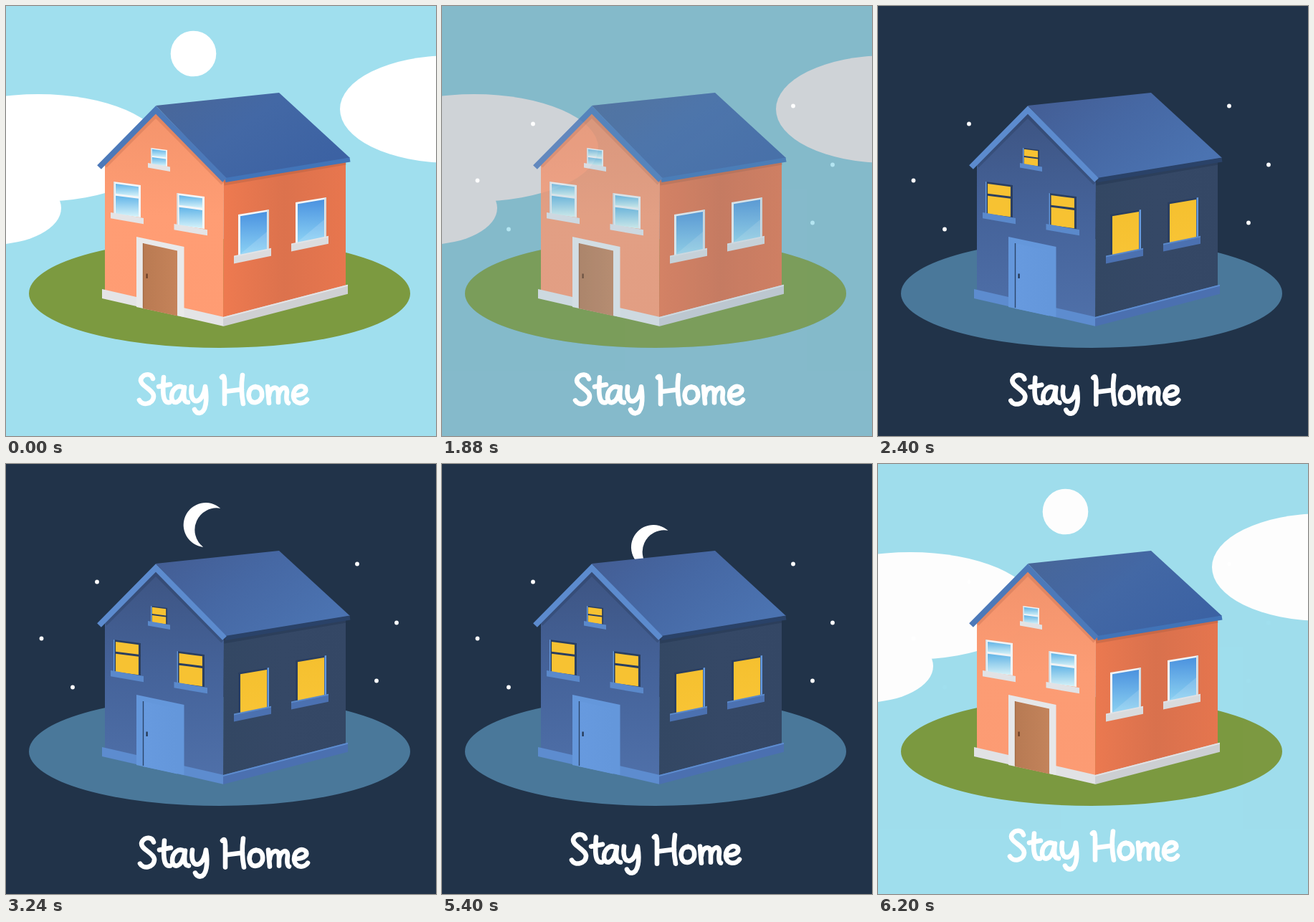
Recreate the animation shown at these times as an HTML page. Size 600x600 px, loop 6.24 s.

```html
<!DOCTYPE html>
<html lang="en">
<head>
<meta charset="utf-8">
<title>Stay Home</title>
<style>
  html, body { margin: 0; width: 100%; height: 100%; overflow: hidden; background: #a0dfee; }
  svg { display: block; width: 100vw; height: 100vh; }
</style>
</head>
<body>
<svg id="stage" viewBox="0 0 600 600"></svg>
<script>
const LOOP = 6240, STEP = 40;

const day = {
  id: 'day', sky: '#a0dfee', grass: '#7c9a40',
  front: ['#f4946c', '#ff9d74', '#ff9c73'], side: ['#ee7a50', '#dc724d', '#e8764e'],
  shade: '#b35f41', roof: ['#4a6798', '#4368a5', '#3c62a3'],
  fascia: '#4c79b9', eave: '#4274b8', baseFront: '#e4e4e6', baseSide: '#cfd0d3',
  door: ['#b97a52', '#c5835a'], doorFrame: '#e9e9ea', doorLine: '#a56a45', knob: '#6b3f27',
  frame: '#f3f6f8', edge: '#d3dade', sill: '#e4e4e6', sideSill: '#dcdcde',
  pane: ['#61b4e8', '#d6f3fa'], sidePane: ['#4a92e0', '#8dd3f5'], glint: .14
};
const night = {
  id: 'night', sky: '#213349', grass: '#4a789a',
  front: ['#3d5482', '#45639a', '#4f70a9'], side: ['#334763', '#354866', '#344765'],
  shade: '#22344f', roof: ['#435c92', '#4668a4', '#4b73b1'],
  fascia: '#5c8bce', eave: '#2a4268', baseFront: '#5d8ccf', baseSide: '#4b70b0',
  door: ['#679adf', '#6497db'], doorFrame: '#6497db', doorLine: '#2c4569', knob: '#21344f',
  frame: '#2a3e60', edge: '#659ae0', sill: '#5a89cb', sideSill: '#4b71b1',
  pane: ['#f7c232', '#f7c232'], sidePane: ['#f5c02f', '#f8c435'], glint: 0
};

const poly = (points, fill) => `<polygon points="${points}" fill="${fill}"/>`;
const line = (d, color, width, extra = '') =>
  `<path d="${d}" fill="none" stroke="${color}" stroke-width="${width}" ${extra}/>`;
const ellipse = (cx, cy, rx, ry, fill = '#fff') =>
  `<ellipse cx="${cx}" cy="${cy}" rx="${rx}" ry="${ry}" fill="${fill}"/>`;
// An upright panel whose horizontal edges follow the wall's slope.
const panel = (x, y, w, h, slope, fill) =>
  poly([x, y, x + w, y + w * slope, x + w, y + w * slope + h, x, y + h], fill);

function gradient(id, colors, x2, y2) {
  const stops = colors.map((c, i) => `<stop offset="${i / (colors.length - 1)}" stop-color="${c}"/>`);
  return `<linearGradient id="${id}" x1="0" y1="0" x2="${x2}" y2="${y2}">${stops.join('')}</linearGradient>`;
}

function frontWindow(p, x, y, w, h, split) {
  const slope = .13, rim = w * .08, inner = w - 2 * rim, bar = h * split;
  const pane = (top, bottom) =>
    panel(x + rim, y + top, inner, bottom - top, slope, `url(#${p.id}Pane)`);
  return panel(x, y, w, h, slope, p.frame)
    + panel(x, y, 1.5, h, slope, p.edge)
    + pane(rim, bar) + pane(bar + rim, h)
    + panel(x - 4, y + h - 2, w + 8, 4 + w * .11, .175, p.sill);
}

function sideWindow(p, x, y) {
  const slope = -.165;
  return panel(x, y, 43, 60, slope, p.frame)
    + panel(x + 40.5, y - 6.6, 2.5, 58, slope, p.edge)
    + panel(x + 3, y + 2.2, 37, 55, slope, `url(#${p.id}SidePane)`)
    + poly([x + 3, y + 55, x + 40, y + 24, x + 40, y + 51, x + 3, y + 57], `rgb(255 255 255 / ${p.glint})`)
    + panel(x - 6, y + 59, 52, 9.5, -.205, p.sideSill)
    + panel(x - 6, y + 57.5, 52, 2, -.205, p.sill);
}

function house(p) {
  const ref = name => `url(#${p.id}${name})`;
  return '<defs>'
    + gradient(p.id + 'Front', p.front, 0, 1)
    + gradient(p.id + 'Side', p.side, 1, 0)
    + gradient(p.id + 'Roof', p.roof, 1, .6)
    + gradient(p.id + 'Door', p.door, 1, 0)
    + gradient(p.id + 'Pane', p.pane, 0, 1)
    + gradient(p.id + 'SidePane', p.sidePane, 0, 1)
    + '</defs>'
    + ellipse(298, 401, 266, 76, p.grass)
    + poly('138,218 209,146 304,242 303,440 138,400', ref('Front'))
    + poly('304,240 474,212 474,395 303,440', ref('Side'))
    + line('M138 223L209 152L303 247', p.shade, 7, 'opacity=".28"')
    + line('M304 247L474 218', p.shade, 7, 'opacity=".45"')
    + poly('209,139 381,121 480,212 307,241', ref('Roof'))
    + line('M306 243L480 214.500', p.eave, 6)
    + line('M130 225L209 145L305 243', p.fascia, 8)
    + frontWindow(p, 202, 198, 23, 23, .48)
    + frontWindow(p, 150, 245, 38, 45, .37)
    + frontWindow(p, 238.5, 261, 38.5, 45, .37)
    + sideWindow(p, 324, 291)
    + sideWindow(p, 404, 274)
    + panel(134, 395, 169, 13, .23, p.baseFront)
    + panel(303, 434, 174, 13, -.26, p.baseSide)
    + panel(303, 434, 174, 2, -.26, p.baseFront)
    + panel(182, 322, 66.5, 98, .21, p.doorFrame)
    + panel(191, 331, 48, 91, .22, ref('Door'))
    + line('M191.500 331V421', p.doorLine, 1.4)
    + line('M196.600 373.500V380', p.knob, 2.2);
}

const sky = p => `<rect width="600" height="600" fill="${p.sky}"/>`;
const daySky = sky(day) + ellipse(45, 198, 173, 75) + ellipse(-20, 282, 97, 51)
  + ellipse(620, 144, 154, 75) + '<circle id="sun" cx="261.5" cy="66.5" r="31.8" fill="#fff"/>';

const stars = [[127, 164.5], [49.5, 243.5], [93, 311.5], [490, 139.5], [545, 221.5], [517, 302.5]];
const nightSky = sky(night) + stars.map(([x, y]) => ellipse(x, y, 2.9, 2.9)).join('')
  + '<path id="moon" fill="#fff" d="M293 50A31 31 0 1 0 269 104A30.4 30.4 0 0 1 293 50Z"/>';

// Hand lettering as pen strokes, one path per letter.
const letters = {
  S: 'M205 520C203 513 194 512 189 519C183 529 207 535 206 545C205 556 190 558 186 550',
  t: 'M220 518C219 532 217 555 228 553M213 531L229 528',
  a: 'M248 533C240 527 231 535 231 546C232 557 244 556 248 536M249 532C247 546 248 553 254 553',
  y: 'M259 531C257 546 261 552 267 551C273 549 277 540 278 531C281 550 279 567 270 568Q265 568 263 563',
  H: 'M301 518C304 514 305 519 305 525V555M330 515Q327 535 331 555M305 538L329 535',
  o: 'M348 531C339 532 337 542 340 549C344 556 354 554 357 545C358 536 354 530 346 532',
  m: 'M365 531L367 554M367 544C368 532 379 528 380 539V553M380 544C382 532 392 528 392 539Q390 552 394 554',
  e: 'M402 543C411 544 420 540 418 534C414 527 401 531 401 544C402 557 416 556 420 549'
};
const lettering = `<g id="lettering" role="img" aria-label="Stay Home" stroke-linecap="round" stroke-linejoin="round">
  ${Object.values(letters).map(d => line(d, '#fff', 6.6)).join('')}</g>`;

const stage = document.getElementById('stage');
stage.innerHTML = `${daySky}<g id="nightSky">${nightSky}</g>
  <g id="houses"><g id="nightHouse">${house(night)}</g><g id="dayHouse">${house(day)}</g></g>${lettering}`;
const part = id => document.getElementById(id);

const progress = (t, start, length) => Math.min(1, Math.max(0, (t - start) / length));
const cubic = u => u * u * u;
const smooth = u => u * u * (3 - 2 * u);
const fade = (id, opacity) => part(id).setAttribute('opacity', opacity);
const move = (id, x, y) => part(id).setAttribute('transform', `translate(${x.toFixed(2)} ${y.toFixed(2)})`);

// Evenly spaced wobble positions, eased from one to the next.
const wobbleX = [0, .5, -.5, 0, 0, -1, 1, 1, 1, -3, -6, -3, -2];
const wobbleY = [0, -1.5, 3, 1, 0, 1, 8, 5, -1, 2, 3.5, 1, -2.5];
function wobble(values, t) {
  const pos = t / LOOP * (values.length - 1), i = Math.floor(pos);
  return values[i] + (values[i + 1] - values[i]) * smooth(pos - i);
}

// Slides a light down behind the roof; depth 1 is fully hidden.
function sink(id, depth) {
  move(id, 50 * depth, 95 * depth);
  fade(id, depth < 1 ? 1 : 0);
}

function draw(t) {
  const firstHalf = t < 4160;
  sink('sun', firstHalf ? cubic(progress(t, 620, 1180)) : 0);
  sink('moon', cubic(firstHalf ? 1 - progress(t, 2640, 1200) : progress(t, 4480, 1200)));

  const darkness = smooth(progress(t, 1755, 420)) - smooth(progress(t, 5798, 420));
  fade('nightSky', darkness);
  fade('nightHouse', darkness);
  fade('dayHouse', 1 - darkness);

  // The house that is fading out lies on top.
  const outgoing = part(firstHalf ? 'dayHouse' : 'nightHouse');
  if (part('houses').lastElementChild !== outgoing) part('houses').append(outgoing);

  move('lettering', wobble(wobbleX, t), wobble(wobbleY, t));
}

const start = performance.now();
function tick() {
  const t = (performance.now() - start) % LOOP;
  draw(Math.floor(t / STEP) * STEP);
  requestAnimationFrame(tick);
}
tick();
</script>
</body>
</html>
```
